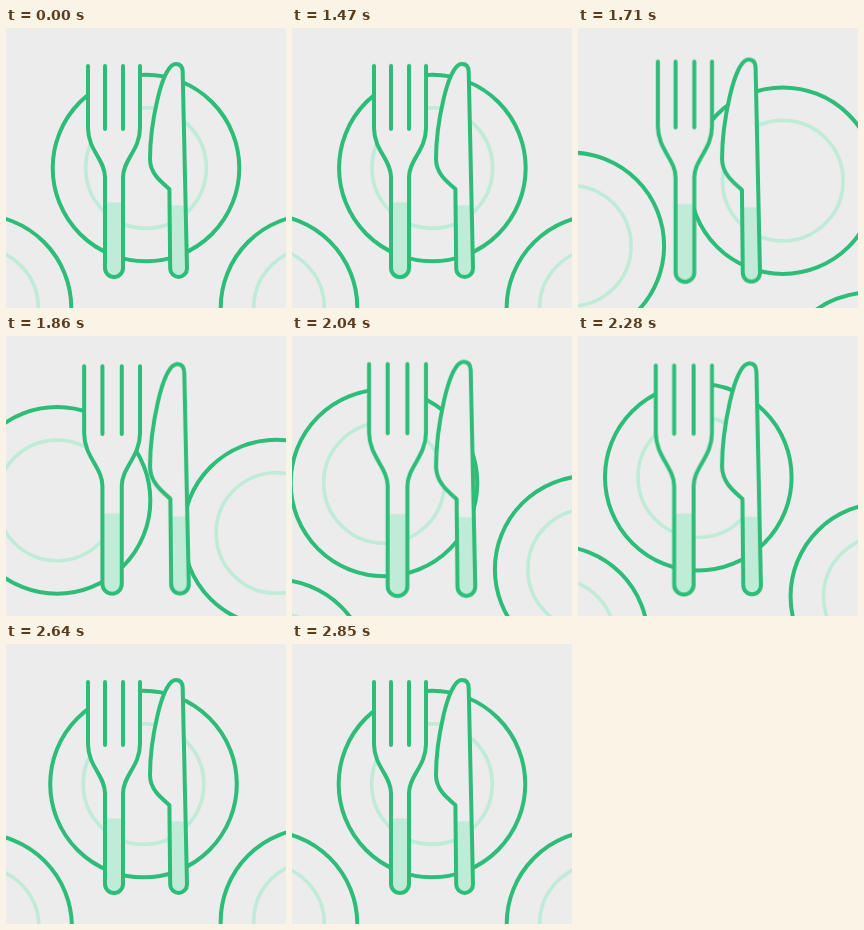
An HTML page without scripts that plays this animation: 280x280 px, repeating every 2880 ms.

```html
<!DOCTYPE html>
<html lang="en">
<head>
<meta charset="utf-8">
<title>Cutlery and plates</title>
<style>
  html, body { margin: 0; width: 100%; height: 100%; overflow: hidden; background: #ececec; }
  svg { display: block; width: 100vw; height: 100vh; }

  path { vector-effect: non-scaling-stroke; }
  .line { fill: none; stroke: #2dbd78; stroke-width: 4; stroke-linecap: round; stroke-linejoin: round; }
  .rim { fill: none; stroke: #c0ebd7; stroke-width: 3.6; }
  .body { fill: #ececec; }
  .grip { fill: #c0ebd7; }

  /* Each plate travels one leg of the carousel per loop. */
  .plate { offset-rotate: 0deg; animation: glide 2.88s infinite; }
  .to-left { offset-path: path("M28 560L-28 280"); }
  .to-top { offset-path: path("M-28 280C-28 213 50 140 140 140"); }
  .to-right { offset-path: path("M140 140C230 140 308 213 308 280"); }
  .to-bottom { offset-path: path("M308 280L252 560"); }
  @keyframes glide {
    0%, 50% { offset-distance: 0%; animation-timing-function: cubic-bezier(.33, 0, 0, 1); }
    100% { offset-distance: 100%; }
  }

  .tool { animation: swell 2.88s cubic-bezier(.333, 0, .667, 1) infinite; }
  .fork { --widen: 1.095; transform-origin: 134px 138px; }
  .knife { --widen: 1.06; transform-origin: 144px 139px; }
  @keyframes swell {
    0%, 50%, 90.3%, 100% { transform: scale(1, 1); }
    70.8%, 75.7% { transform: scale(var(--widen), 1.1); }
  }
</style>
</head>
<body>
<svg viewBox="0 0 280 280">
  <defs>
    <g id="plate">
      <circle class="rim" r="60.3"/>
      <circle class="line" r="93.3"/>
    </g>
    <path id="fork" d="M82 38V100C82 122 99 132 99 149V240a9 9 0 0 0 18 0V149C117 132 134 122 134 100V38"/>
    <path id="knife" d="M163.4 161C154 153 144 145 144 131C144 100 155 36 170 36C175 36 176.6 39 176.7 44L181 240.5a8.4 8.4 0 0 1-16.8 0Z"/>
  </defs>

  <use href="#plate" class="plate to-left"/>
  <use href="#plate" class="plate to-top"/>
  <use href="#plate" class="plate to-right"/>
  <use href="#plate" class="plate to-bottom"/>

  <g class="tool fork">
    <use href="#fork" class="body"/>
    <path class="grip" d="M99 174.5V240a9 9 0 0 0 18 0V174.5Z"/>
    <use href="#fork" class="line"/>
    <path class="line" d="M99 38V101M117 38V101"/>
  </g>

  <g class="tool knife">
    <use href="#knife" class="body"/>
    <path class="grip" d="M163.6 177.5H179.6L181 240.5a8.4 8.4 0 0 1-16.8 0Z"/>
    <use href="#knife" class="line"/>
  </g>
</svg>
</body>
</html>
```
